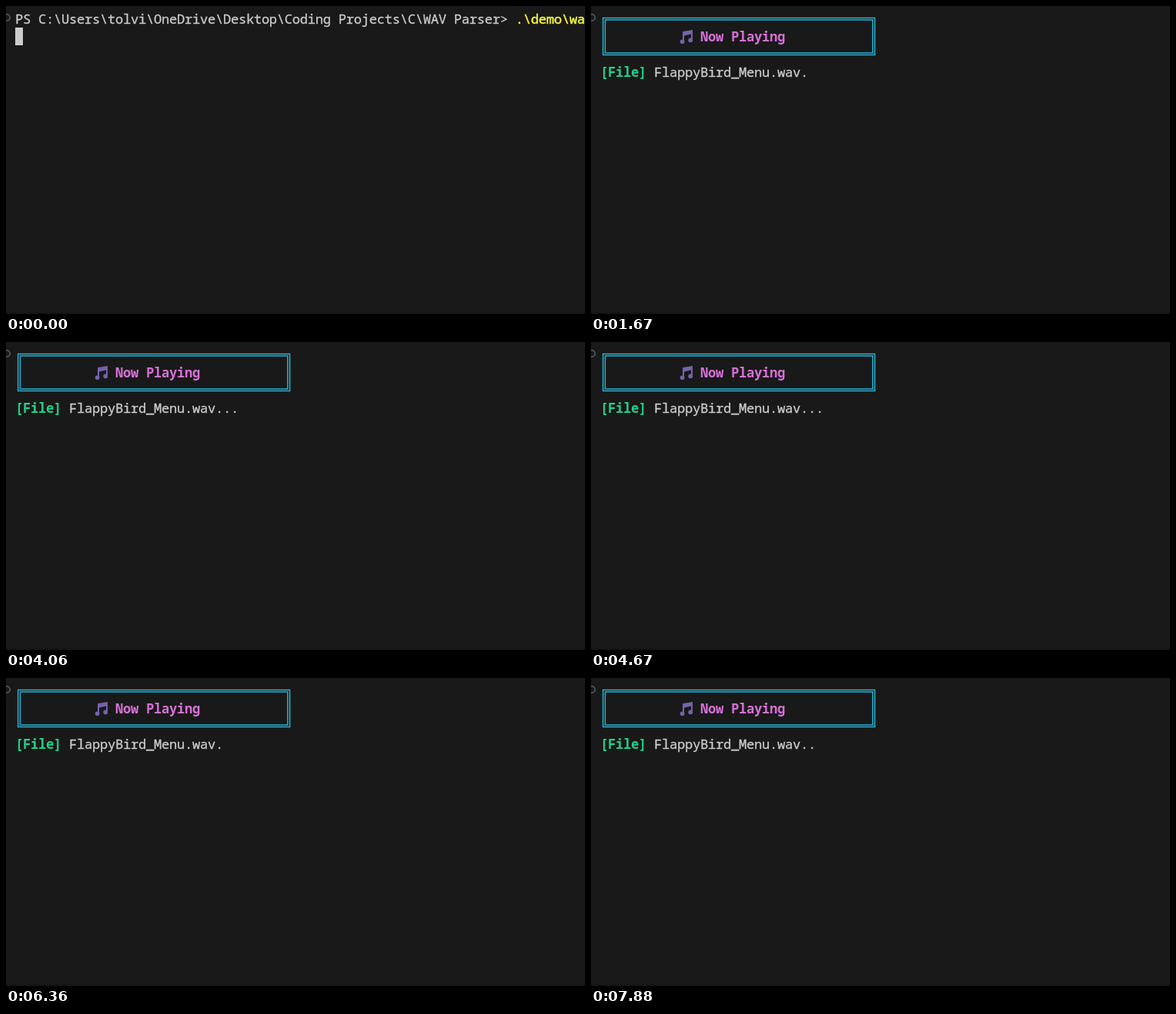
Animation of 752x400 px, one loop 7910 ms. Source, as an HTML page:

```html
<!DOCTYPE html>
<html lang="en">
<head>
<meta charset="utf-8">
<title>Now Playing</title>
<style>
  html, body { margin: 0; width: 100%; height: 100%; overflow: hidden; background: #191919; }
  svg { display: block; }
  /* The terminal grid is 10px wide; a thin outline gives the medium weight. */
  text {
    font: 17.1px "Noto Sans Mono", "DejaVu Sans Mono", monospace;
    letter-spacing: calc(10px - 0.6em);
    white-space: pre;
    fill: #ccc;
    stroke: #ccc;
    stroke-width: 0.3;
  }
  .command { fill: #f5f543; stroke: #f5f543; stroke-width: 0.5; }
  .bold { font-weight: 700; stroke: none; }
  .title { fill: #d670d6; }
  .label { fill: #23d18b; }
  .frame { fill: none; stroke: #29b8db; stroke-width: 1.4; }
</style>
</head>
<body>
<svg width="752" height="400" viewBox="0 0 752 400">
  <rect width="752" height="400" fill="#191919"/>
  <rect y="398" width="752" height="2" fill="#141414"/>
  <circle cx="1" cy="15" r="4.2" fill="none" stroke="#555" stroke-width="1.8"/>

  <g id="prompt">
    <text x="12" y="23">PS C:\Users\tolvi\OneDrive\Desktop\Coding Projects\C\WAV Parser&gt; <tspan class="command">.\demo\wa</tspan></text>
    <rect x="12" y="28" width="10" height="23" fill="#ccc"/>
  </g>

  <g id="player">
    <rect class="frame" x="15.6" y="15.5" width="353" height="48"/>
    <rect class="frame" x="18.4" y="18" width="347.4" height="43"/>
    <g fill="#7562ab">
      <path d="M119 33.2 132 31V45H130V36.4L121 38.4V46.5H119Z"/>
      <ellipse cx="118.6" cy="46.2" rx="2.9" ry="2.8"/>
      <ellipse cx="129.2" cy="44.4" rx="2.9" ry="2.8"/>
    </g>
    <text class="bold title" x="142" y="46">Now Playing</text>
    <text class="bold label" x="12" y="92">[File]</text>
    <text id="file" x="82" y="92"></text>
  </g>
</svg>
<script>
  const LOOP = 7910, CLEAR_AT = 60, DOT_STEP = 1180;
  const [prompt, player, file] = ["prompt", "player", "file"].map(id => document.getElementById(id));
  const show = (el, on) => el.setAttribute("visibility", on ? "visible" : "hidden");

  function render(t) {
    const playing = t >= CLEAR_AT;
    show(prompt, !playing);
    show(player, playing);
    const dots = playing ? Math.floor((t - CLEAR_AT) / DOT_STEP) % 4 : 0;
    file.textContent = "FlappyBird_Menu.wav" + ".".repeat(dots);
  }

  const start = performance.now();
  function tick() {
    render((performance.now() - start) % LOOP);
    requestAnimationFrame(tick);
  }
  render(0);
  requestAnimationFrame(tick);
</script>
</body>
</html>
```
